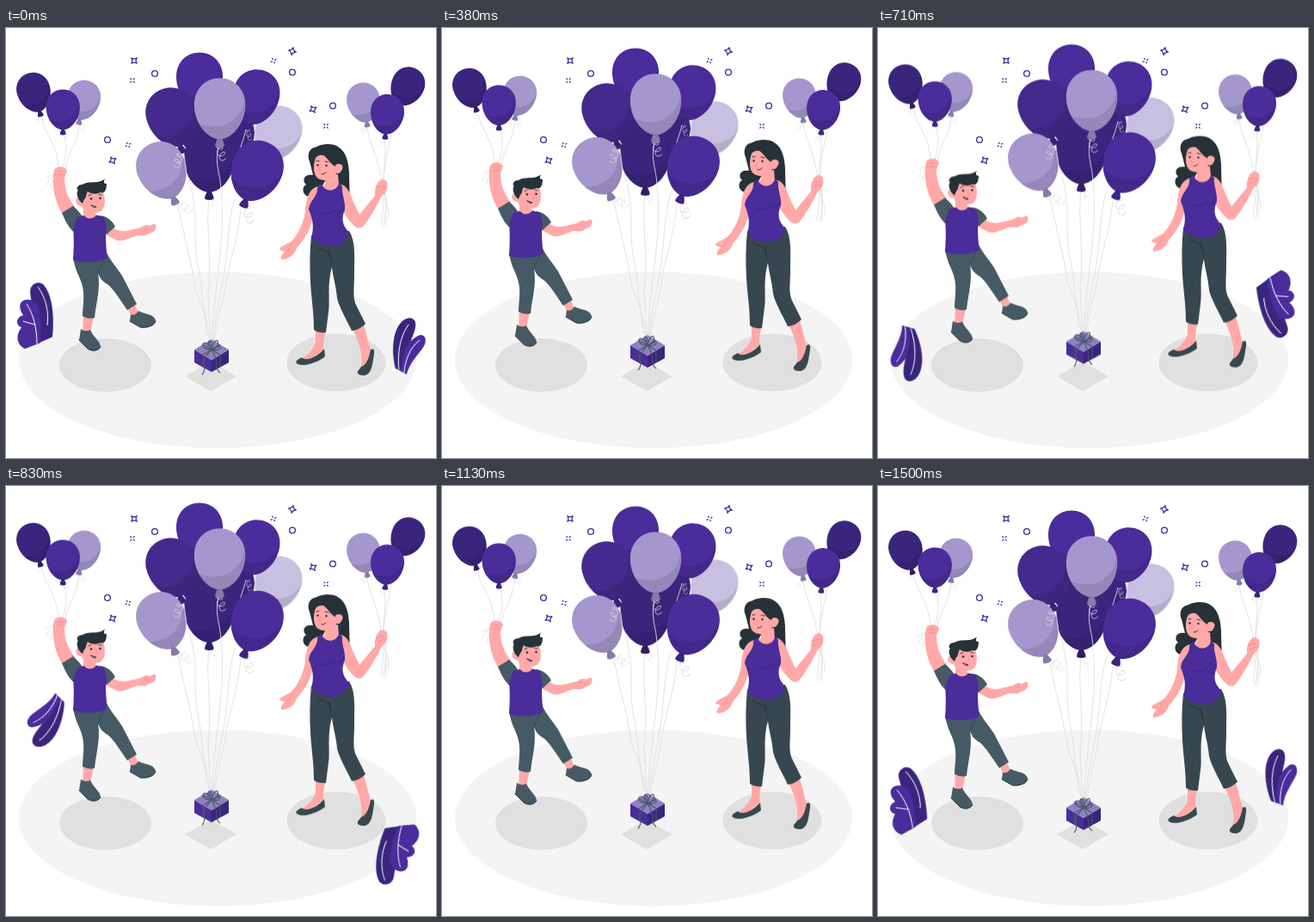
Write an HTML page that moves like this. It is 500 px wide and 500 px high and loops after 1540 ms.

```html
<!DOCTYPE html>
<html lang="en">
<head>
<meta charset="utf-8">
<title>Balloons</title>
<style>
html, body { margin: 0; width: 100%; height: 100%; overflow: hidden; background: #fff; }
svg { display: block; width: 100%; height: 100%; }
.bob { animation: bob 1540ms linear infinite; }
.spin { transform-origin: 250px 351px; animation: spin 1540ms linear infinite; }
@keyframes bob {
  0%, 97.4%, 100% { transform: translateY(0); }
  48.7% { transform: translateY(-10px); }
}
@keyframes spin {
  0% { transform: rotate(0deg); }
  83.77% { transform: rotate(305deg); }
  97.4% { transform: rotate(351.8deg); }
  100% { transform: rotate(360deg); }
}
.mid { color: #4a2c9b; fill: #4a2c9b; }
.deep { color: #432a8c; fill: #432a8c; }
.dark { color: #3a257d; fill: #3a257d; }
.pale { color: #a497cd; fill: #a497cd; }
.mist { color: #c8c0e1; fill: #c8c0e1; }
.skin { fill: #ffa8a7; }
.ink { fill: #263238; }
.slate { fill: #455a64; }
.coal { fill: #37474f; }
.line { fill: none; stroke: #e0e0e0; stroke-width: .9; }
.vein { fill: none; stroke: #fff; stroke-width: 1; stroke-linecap: round; }
.pen { fill: none; stroke: #263238; stroke-width: .9; stroke-linecap: round; }
.bow { fill: none; stroke: #455a64; stroke-width: 1.1; }
.fleck { fill: none; stroke: #4a2c9b; stroke-width: 1.3; stroke-linejoin: round; }
.fold { fill: none; stroke: #263238; stroke-width: .8; opacity: .6; }
.blush { fill: none; stroke: #f28f8f; stroke-width: .8; }
</style>
</head>
<body>
<svg viewBox="0 0 500 500">
  <defs>
    <g id="balloon" fill="currentColor">
      <path d="M-2 34L2 34C4 38 6 42 5 44Q0 46-5 44C-6 42-4 38-2 34Z"/>
      <path d="M0 36C-15 35-30 17-30-5C-30-23-17-36 0-36C17-36 30-23 30-5C30 17 15 35 0 36Z"/>
      <path fill="#000" opacity=".1" d="M29.300-12C32 15 15 35 0 36C-9 36-19 28-25 17C2 28 26 14 29.300-12Z"/>
      <path fill="#000" opacity=".18" d="M-2 35L2 35C4 38 6 42 5 44Q0 46-5 44C-6 42-4 38-2 35Z"/>
    </g>
    <path id="curl" class="line" d="M0 0C4 4 11 4 10 1S1 3 2 8S12 12 13 8S5 8 5 13S12 18 15 14"/>
    <path id="star" class="fleck" d="M-3.200-3.200Q0-1 3.200-3.200Q1 0 3.200 3.200Q0 1-3.200 3.200Q-1 0-3.200-3.200Z"/>
    <path id="spark" class="fleck" d="M-2.600-2.600L-1-1M2.600-2.600L1-1M-2.600 2.600L-1 1M2.600 2.600L1 1"/>
    <circle id="ring" class="fleck" r="3.400"/>
  </defs>

  <ellipse cx="246" cy="386" rx="231" ry="102.5" fill="#f4f4f4"/>
  <g fill="#e0e0e0">
    <ellipse cx="115.5" cy="392" rx="53.5" ry="31"/>
    <ellipse cx="384" cy="389" rx="57.5" ry="33.5"/>
    <path d="M238 388L268 405L238 422.5L208 405Z"/>
  </g>

  <use href="#star" x="149" y="38"/>
  <use href="#star" transform="translate(333 27) rotate(58)"/>
  <use href="#star" transform="translate(357 94.500) rotate(15)"/>
  <use href="#star" transform="translate(124 154) rotate(15)"/>
  <use href="#spark" x="147" y="61"/>
  <use href="#spark" transform="translate(311 38) rotate(20)"/>
  <use href="#spark" x="372" y="114"/>
  <use href="#spark" transform="translate(142 136) rotate(15)"/>
  <use href="#ring" x="173" y="53"/>
  <use href="#ring" x="333" y="51.500"/>
  <use href="#ring" x="380" y="90.500"/>
  <use href="#ring" x="118" y="130"/>

  <!-- plants -->
  <g class="spin">
    <path class="dark" d="M32 370L54 360C56 340 55 313 44 300C38 294 29 298 28 306C28 316 33 328 32 370Z"/>
    <path class="mid" d="M22 374C12 369 11 358 18 349C10 346 12 337 20 335C14 327 15 318 23 317C31 316 37 320 38 328C42 345 41 356 40 367Z"/>
    <path class="vein" d="M37 302C47 316 50 332 48 346M24 322C32 334 36 350 36 368M20 342L34 346"/>
    <path class="dark" d="M453 395C448 375 449 349 462 339C470 333 478 337 476 347C474 360 464 370 463 400Z"/>
    <path class="mid" d="M459 398L466 402C470 386 483 376 487 367C490 359 485 354 479 357C463 365 461 384 459 398Z"/>
    <path class="vein" d="M468 344C458 358 455 377 457 396M481 362C469 371 464 387 463 400"/>
  </g>

  <g class="bob">
    <!-- left balloons -->
    <g class="line">
      <path d="M42 104C43 122 60 132 61 165M67 124C73 140 69 150 65 167M85 112C82 140 73 140 69 165"/>
      <path d="M62 166Q50 174 47 183M62 168Q52 177 52 187M63 168Q56 178 56 185M62 166L46 175"/>
    </g>
    <use href="#curl" transform="translate(41 102) scale(-.45 .5)"/>
    <use href="#curl" transform="translate(67 122) scale(.45)"/>
    <use href="#curl" transform="translate(85 111) scale(.55)"/>
    <use href="#balloon" class="dark" transform="translate(32.700 75) rotate(-16) scale(.65)"/>
    <use href="#balloon" class="pale" transform="translate(90 84) rotate(11) scale(.65)"/>
    <use href="#balloon" class="mid" transform="translate(66.200 95) scale(.655)"/>

    <!-- boy -->
    <path class="skin" d="M55 171C54 188 57 202 66 217L80 208C71 196 68 186 68 174L71 166C68 160 60 160 56 165Z"/>
    <path class="skin" d="M117 228C125 234 133 237 140 236L157 232C161 229 164 228 167 230C170 229 173 226 174 229C176 233 172 238 166 239C161 243 158 241 153 241C143 244 136 249 129 247L114 239Z"/>
    <path class="skin" d="M142 327L150 322L155 333L147 338ZM90 334L102 335L98 355L89 355Z"/>
    <path class="slate" d="M145 333Q150 335 154 329C161 333 172 332 174 340C174 347 162 350 156 348L144 341Z"/>
    <path class="slate" d="M87 350Q92 354 98 351C101 359 110 364 110 371C106 377 99 376 95 373L85 363Z"/>
    <path class="pen" d="M144 341L156 348C162 349 172 347 174 341M85 363L95 373C100 376 107 376 110 371"/>
    <path class="slate" d="M78 266L117 261C121 270 130 280 135 288L152 321L141 328C134 318 125 303 118 298C111 294 108 289 107 284C110 304 105 318 103 337Q96 339 89 335C90 315 93 306 84 287Q79 276 78 266Z"/>
    <path class="fold" d="M114 268C113 275 108 279 107 286"/>
    <path class="slate" d="M65 215L78 207C83 211 87 216 89 220L80 238C73 233 69 224 65 215ZM109 218C117 219 123 223 127 231L117 240L110 234Z"/>
    <path class="mid" d="M83 220Q99 214 114 220L117 232C115 245 117 257 117.500 268Q98 276 78 270C79 255 79 241 78 234Z"/>
    <path class="skin" d="M90 207L104 212L104 219Q96 225 90 217Z"/>
    <path class="skin" d="M89 192C96 184 111 185 114 193C116 203 115 212 108 214C99 217 89 212 88 207C81 207 79 199 84 197Z"/>
    <path class="ink" d="M89 204C83 200 81 191 84 189C81 187 83 182 89 182C97 177 109 182 115 175C113 180 114 181 117 181C117 189 114 193 110 191C105 194 99 193 95 190C93 193 93 199 91 199Z"/>
    <circle class="ink" cx="99" cy="198.500" r="1.300"/>
    <circle class="ink" cx="109.500" cy="198" r="1.300"/>
    <path class="pen" d="M96 195L99 193.500M108 193.500L111 194M99 206Q102 210 105 208L99 206"/>
    <path class="blush" d="M104 199L107 203L104 203.500M59 167L66 166M60 171L67 170M160 233L167 235"/>

    <!-- centre bunch -->
    <g class="line">
      <path d="M200 206C206 238 214 265 219 295C221 315 230 320 232 342Q233 356 238 364"/>
      <path d="M208 146C210 175 221 195 220 230C219 275 228 285 228 315Q233 342 238 364"/>
      <path d="M236 199C232 235 240 265 235 310Q236 340 239 364"/>
      <path d="M266 197C258 225 259 250 254 285C249 315 243 335 241 364"/>
      <path d="M273 210C270 245 260 270 256 295C253 318 246 338 242 364"/>
    </g>
    <use href="#curl" transform="translate(200 205) rotate(-28) scale(.85)"/>
    <use href="#curl" transform="translate(238 199) scale(.55 .65)"/>
    <use href="#curl" transform="translate(275 207) scale(.9 1.150)"/>
    <use href="#balloon" class="mist" transform="translate(315.700 122.500) rotate(20) scale(.9)"/>
    <use href="#balloon" class="mid" transform="translate(225 61) scale(.9)"/>
    <ellipse class="dark" cx="246" cy="122" rx="43" ry="35"/>
    <use href="#balloon" class="mid" transform="translate(290.500 80.500) rotate(12) scale(.9)"/>
    <use href="#balloon" class="dark" transform="translate(236.300 156) scale(.98)"/>
    <use href="#balloon" class="deep" transform="translate(193 104) rotate(-16) scale(.97)"/>
    <use href="#balloon" class="pale" transform="translate(181.800 166) rotate(-22) scale(.95)"/>
    <path class="line" d="M279 118C277 128 273 135 271 147M207 147L210 170"/>
    <use href="#curl" transform="translate(206 146) scale(-.75 .95)"/>
    <use href="#curl" transform="translate(279 118) scale(.45 .75)"/>
    <use href="#balloon" class="mid" transform="translate(291 166.500) rotate(20) scale(1)"/>
    <use href="#balloon" class="pale" transform="translate(248.500 94) scale(.99)"/>
    <path class="line" d="M247 138C242 160 250 170 250 190C255 230 247 275 245 300Q240 335 240 364"/>
    <use href="#curl" transform="translate(244 138) scale(.8 .95)"/>

    <!-- gift -->
    <path class="mid" d="M219 374L239 386V400L219 389Z"/>
    <path class="dark" d="M259 374L239 386V400L259 389Z"/>
    <path fill="#8f80c2" d="M239 362L259 374L239 386L219 374Z"/>
    <path class="bow" d="M229 368L249 380V394M249 368L229 380V394"/>
    <path class="bow" d="M239 374C229 374 226 367 231 366C235 366 237 370 239 374C241 365 244 362 246 364C248 368 244 374 239 374C236 367 234 363 237 364Q240 367 239 374C246 371 250 368 249 372Q246 376 239 374C233 380 228 388 231 394Q231 400 228 403M239 374Q245 384 245 393Q245 398 249 401"/>

    <!-- right balloons -->
    <g class="line">
      <path d="M452 95C451 125 440 145 439 183M420 115C422 135 434 150 437 183M440 129C443 148 438 160 439 183"/>
      <path d="M438 192Q440 210 436 229M440 190Q443 210 439 232M442 192Q442 215 442 231M438 194Q446 208 445 222"/>
    </g>
    <use href="#curl" transform="translate(420 113) scale(-.55 .6)"/>
    <use href="#curl" transform="translate(440 128) scale(-.45 .5)"/>
    <use href="#balloon" class="dark" transform="translate(466.500 68.300) rotate(24) scale(.645)"/>
    <use href="#balloon" class="pale" transform="translate(416 86.800) rotate(-9) scale(.645)"/>
    <use href="#balloon" class="mid" transform="translate(443.300 100.500) rotate(5) scale(.65)"/>

    <!-- woman -->
    <path class="ink" d="M357 171C346 169 344 178 349 182C343 185 345 195 352 196Q359 198 364 190L371 178L386 181C390 185 388 203 397 209C401 200 399 184 399 168C398 148 391 135 374 135C364 135 361 139 358 139C352 141 350 149 353 155Z"/>
    <path class="skin" d="M371 172L386 170L387 182Q394 182 396 190L388 202H359L358 188Q370 183 371 181Z"/>
    <path class="skin" d="M366 184C353 184 349 197 348 213C346 227 340 239 333 247C327 252 318 254 318 258L324 260C318 266 319 270 322 269C330 268 336 263 338 256C349 243 356 231 357 217Z"/>
    <path class="skin" d="M386 182C394 180 400 190 403 200L411 217L429 195C428 184 433 176 439 176L443 179C444 186 443 192 437 195C430 209 422 223 415 231Q410 235 405 230C396 222 390 210 386 199Z"/>
    <path class="skin" d="M360 350L372 350C369 362 369 369 369 374L351 387H341C351 381 359 371 360 365ZM402 348L416 345C420 358 422 369 425 377L419 399L411 400C416 386 414 372 402 348Z"/>
    <path class="coal" d="M344 383C350 389 363 381 370 373L371 382C362 389 346 395 338 390Q335 387 344 383ZM413 394Q421 391 424 374Q429 371 428 379C426 390 426 402 417 404Q407 404 409 399Z"/>
    <path class="coal" d="M355 241L399 236C407 249 405 267 405 285C405 304 403 312 407 322L418 344Q411 351 402 352C396 339 387 324 385 314C384 301 380 289 379 278C373 299 377 317 375 330L372 354Q364 355 358 351C358 330 355 314 354 296C353 278 353 260 355 241Z"/>
    <path class="ink" opacity=".65" d="M360 254C365 260 371 258 374 261L379 278L377 260Q369 258 360 254Z"/>
    <path class="mid" d="M366 180C371 193 386 190 387 180L391 184C390 193 395 202 394 211C390 221 390 229 400 239C395 248 388 254 379 254C370 254 360 250 355 244C359 230 356 221 352 211C353 200 363 196 362 186Z"/>
    <path fill="none" stroke="#3a257d" stroke-width="1" d="M364 214Q374 220 383 212M386 214Q391 212 393 207"/>
    <path class="skin" d="M360 151C366 144 377 149 383 159C390 156 394 161 390 166C388 170 386 169 384 169C381 176 372 179 365 176C358 174 356 162 360 151Z"/>
    <path class="ink" d="M357 160C356 152 359 148 364 146C373 147 376 158 383 161L386 150L376 139L362 139L354 147L353 155Z"/>
    <circle class="ink" cx="362.500" cy="159.500" r="1.200"/>
    <circle class="ink" cx="372.500" cy="160" r="1.200"/>
    <path class="pen" d="M361 155L364 154.500M371 155L375 156M367 170Q370 170.500 372 168"/>
    <path class="blush" d="M367 160L364 165L367 166M431 185L440 183M432 190L441 187M333 250L327 260"/>
  </g>
</svg>
</body>
</html>
```
